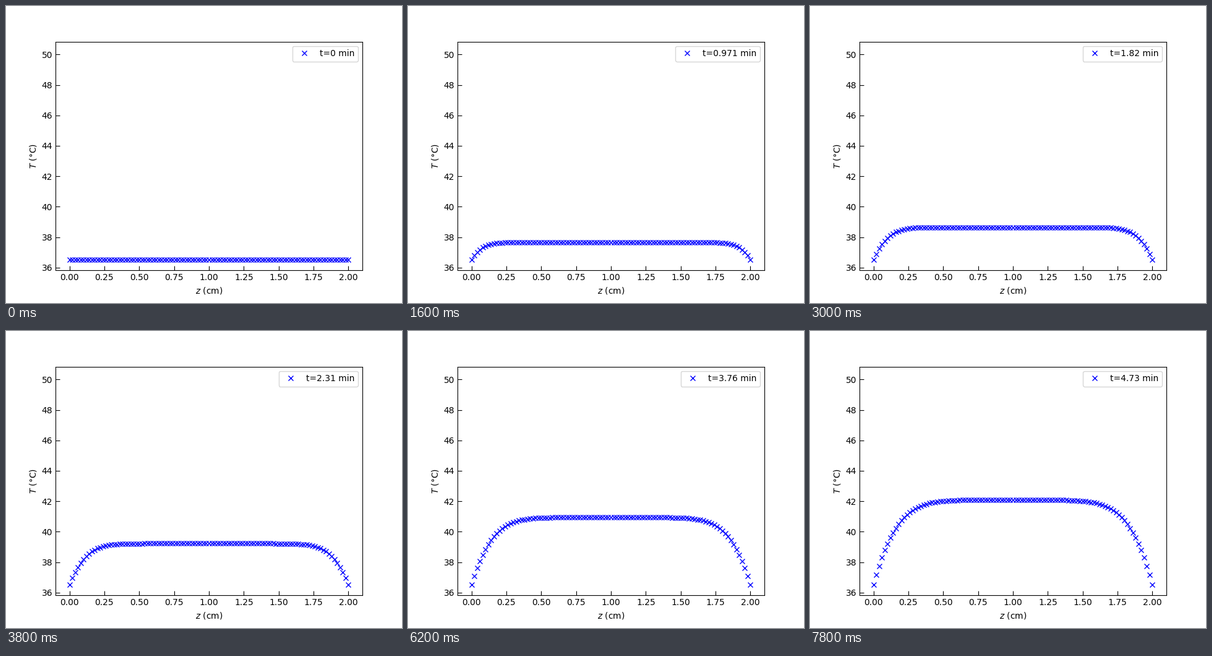
Recreate the animation shown at these times as a matplotlib script. Size 640 by 480 pixels, loop 8000 ms.

```python
import math

import matplotlib.pyplot as plt
import numpy as np
from matplotlib.animation import FuncAnimation

FRAMES, INTERVAL = 40, 200
STEP = 0.12136        # minutes per frame
BASE = 36.5           # start and wall temperature, deg C
HEATING = 1.18        # deg C per minute
DIFFUSIVITY = 0.007   # cm^2 per minute
WIDTH = 2.0           # slab thickness, cm
TOP = 50.16           # highest temperature the axis makes room for

z = np.linspace(0, WIDTH, 101)
erfc = np.vectorize(math.erfc)


def wall_loss(dist, t):
    """Share of the heating lost to a cold wall at the given distance."""
    s = dist / (2 * math.sqrt(DIFFUSIVITY * t))
    return (1 + 2 * s**2) * erfc(s) - 2 * s * np.exp(-s**2) / math.sqrt(math.pi)


def temperature(t):
    if t == 0:
        return np.full_like(z, BASE)
    kept = 1 - wall_loss(z, t) - wall_loss(WIDTH - z, t)
    kept[[0, -1]] = 0
    return BASE + HEATING * t * kept


fig, ax = plt.subplots(figsize=(6.4, 4.8), dpi=100)
line, = ax.plot(z, temperature(0), "bx", label="t=0 min")
margin = 0.05 * (TOP - BASE)
ax.set_ylim(BASE - margin, TOP + margin)
ax.tick_params(direction="in", length=5)
ax.set_xlabel("$z$ (cm)")
ax.set_ylabel("$T$ (°C)")
label = ax.legend(loc="upper right").get_texts()[0]


def update(i):
    t = i * STEP
    line.set_ydata(temperature(t))
    label.set_text(f"t={t:.3g} min")
    return line, label


anim = FuncAnimation(fig, update, frames=FRAMES, interval=INTERVAL, repeat=True)
plt.show()
```
